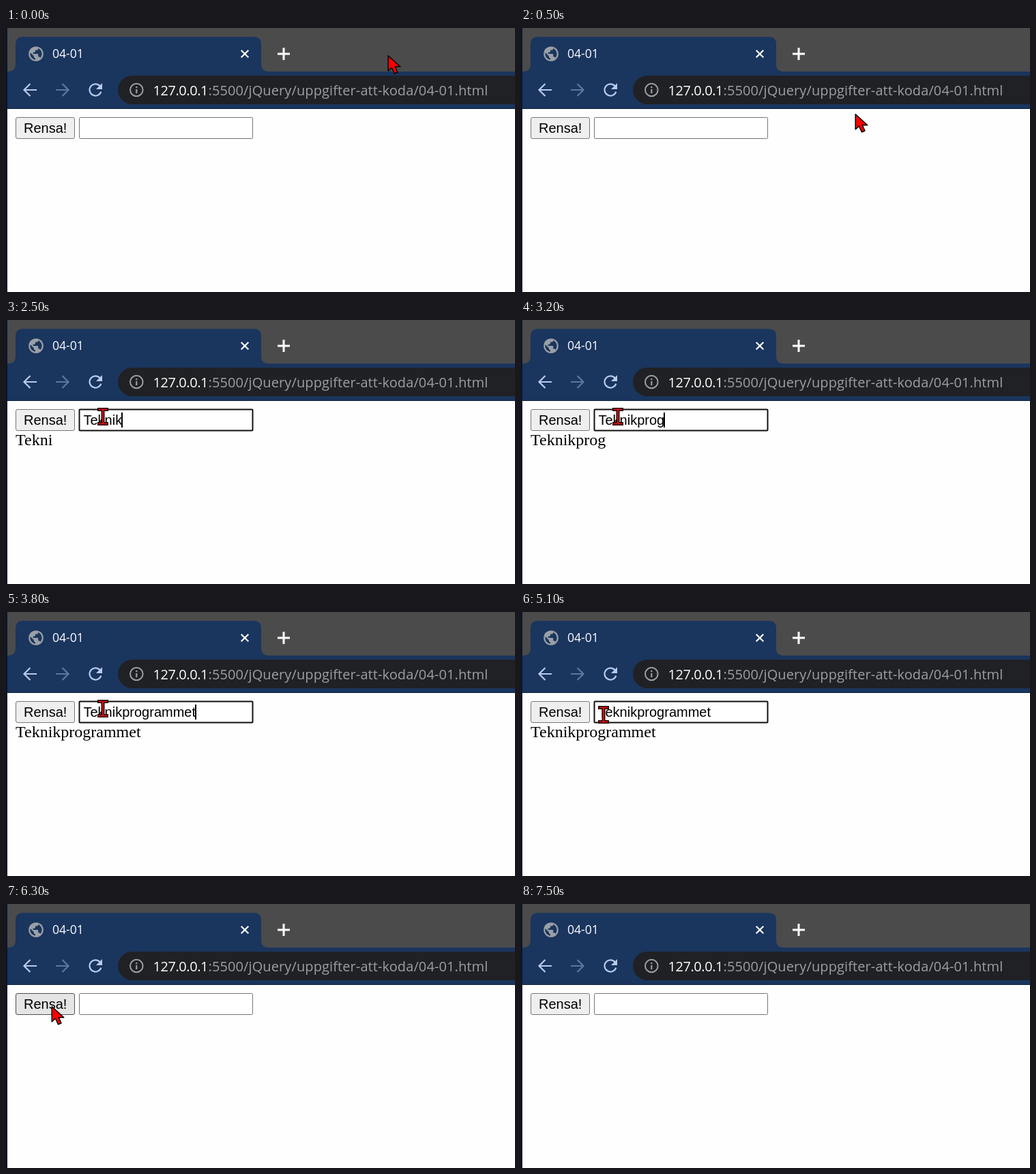
Write an HTML page that moves like this. It is 746 px wide and 388 px high and loops after 7.6 s.

```html
<!DOCTYPE html>
<html lang="sv">
<head>
<meta charset="utf-8">
<title>04-01</title>
<style>
  html, body { margin: 0; width: 100%; height: 100%; overflow: hidden; background: #fefefe; }
  svg { display: block; }
  .ui { font-family: "Open Sans", "Noto Sans", sans-serif; }
  .field { font: 20px "Liberation Sans", Arial, sans-serif; }
  .page { font: 24px "Liberation Serif", "Times New Roman", serif; }
  .line { fill: none; stroke-width: 2.2; }
  #button { fill: #efefef; stroke: #767676; }
  #button.hover { fill: #e5e5e5; stroke: #4f4f4f; }
  #button.pressed { fill: #f5f5f5; stroke: #8d8d8d; }
  #input { fill: #fff; stroke: #767676; }
  #input.focus { stroke: #101010; stroke-width: 2; }
</style>
</head>
<body>
<svg width="746" height="388" viewBox="0 0 746 388">
  <rect width="746" height="388" fill="#fefefe"/>

  <!-- browser frame -->
  <rect width="746" height="66" fill="#4b4b4b"/>
  <rect y="64" width="746" height="55" fill="#1a355e"/>
  <path d="M3 64Q14 64 14 53V24Q14 13 25 13H363Q374 13 374 24V53Q374 64 385 64Z" fill="#1a355e"/>
  <rect y="118" width="746" height="1" fill="#0d2140"/>
  <rect width="2" height="388" fill="#081630"/>

  <!-- tab -->
  <circle cx="44" cy="38" r="10.8" fill="#9aa0a6"/>
  <path d="M43 46.6C38.700 46 35.400 42.400 35.400 38Q35.400 37 35.600 36.100L40.800 41.200V42.300Q41 44.300 43 44.500ZM50.400 43.800Q49.800 42.300 48.300 42.300H47.200V39.100Q47.100 38 46.200 38H39.700V35.800H41.800Q42.900 35.700 42.900 34.800V32.600H45.100Q47 32.400 47.200 30.500V30C50.400 31.300 52.600 34.400 52.600 38Q52.600 41.400 50.400 43.800Z" fill="#1a355e"/>
  <text class="ui" x="68" y="44" font-size="17.6" fill="#fff">04-01</text>
  <path class="line" d="M344.7 32.7L355.3 43.3M355.3 32.7L344.7 43.3" stroke="#fff"/>
  <path d="M398 38H416M407 29V47" stroke="#fff" stroke-width="3"/>

  <!-- toolbar -->
  <path class="line" d="M45 91H27M35.5 82L26.5 91L35.5 100" stroke="#b8cbec"/>
  <path class="line" d="M73 91H91M82.5 82L91.5 91L82.5 100" stroke="#5f779f"/>
  <path class="line" d="M138.3 86.2A8.6 8.6 0 1 0 139.3 93.6" stroke="#b8cbec"/>
  <path d="M141 81V90H132Z" fill="#b8cbec"/>
  <path d="M746 70H185A21 21 0 0 0 185 112H746Z" fill="#202124"/>
  <circle cx="191.3" cy="91" r="9.3" fill="none" stroke="#9aa0a6" stroke-width="2"/>
  <path d="M190.2 90H192.4V96H190.2ZM190.2 86H192.4V88.2H190.2Z" fill="#9aa0a6"/>
  <text class="ui" x="215.5" y="98.6" font-size="20" letter-spacing="-.45" fill="#fff">127.0.0.1</text>
  <text class="ui" x="296.5" y="98.6" font-size="20" letter-spacing=".1" fill="#9aa0a6">:5500/jQuery/uppgifter-att-koda/04-01.html</text>

  <!-- page -->
  <rect id="button" x="14.5" y="131.5" width="86" height="31" rx="2.5"/>
  <text class="field" x="26" y="154">Rensa!</text>
  <rect id="input" x="107.5" y="131.5" width="254" height="31" rx="1"/>
  <text id="typed" class="field" x="113.5" y="154"></text>
  <rect id="caret" y="136" width="2" height="22"/>
  <text id="output" class="page" x="14" y="184"></text>

  <!-- pointers, hot spot at 0,0 -->
  <path id="arrow" d="M.2 .8V23L5.400 18.300L9.500 27L14 25L10.200 16.800H17.800Z"
        fill="#f00" stroke="#000" stroke-width="1.5" stroke-linejoin="round"/>
  <g id="beam" fill="none">
    <path d="M-8 -10.5H8M0 -10.5V10.5M-8 10.5H8" stroke="#1a0000" stroke-width="5"/>
    <path d="M-6.5 -10.5H6.5M0 -10.5V10.5M-6.5 10.5H6.5" stroke="#d41212" stroke-width="2.2"/>
  </g>
</svg>
<script>
const LOOP = 7600, STEP = 100, WORD = "Teknikprogrammet";
const FOCUS = 800, PRESS = 6000, RELEASE = 6300;
const TYPE_START = 1700, TYPE_END = 3700, KEY_HOLD = 60, BLINK = 460;

const [button, input, typed, caret, output, arrow, beam] =
  ["button", "input", "typed", "caret", "output", "arrow", "beam"].map(id => document.getElementById(id));

// time, x, y where the hand turns or rests
const path = [
  [0, 560, 40], [300, 679, 118], [FOCUS, 142, 142], [4600, 142, 142], [4900, 304, 145],
  [5100, 121, 151], [5300, 67, 150], [6500, 67, 150], [7000, 725, 82], [7100, 800, 70]
];
// time, index of the key pressed
const rhythm = [[TYPE_START, 0], [2450, 5], [3230, 10], [TYPE_END, 15]];

const linear = u => u;
const smooth = u => u * u * (3 - 2 * u);

function track(points, t, ease) {
  const next = points.findIndex(p => p[0] > t);
  if (next < 0) return points.at(-1).slice(1);
  const [a, b] = [points[next - 1], points[next]];
  const u = ease((t - a[0]) / (b[0] - a[0]));
  return a.slice(1).map((v, i) => v + (b[i + 1] - v) * u);
}

const lettersAt = t => t < TYPE_START ? 0 : Math.floor(track(rhythm, t, linear)[0]) + 1;
const show = (node, on) => node.setAttribute("visibility", on ? "visible" : "hidden");

function inside(node, x, y) {
  const box = node.getBBox();
  return x >= box.x && x <= box.x + box.width && y >= box.y && y <= box.y + box.height;
}

function caretOn(t) {
  if (t >= TYPE_START && t < TYPE_END) return true;
  const since = t < TYPE_START ? FOCUS : TYPE_END;
  return Math.floor((t - since) / BLINK) % 2 === 0;
}

function draw(t) {
  const [x, y] = track(path, t, smooth);
  const overInput = inside(input, x, y);
  show(beam, overInput);
  show(arrow, !overInput);
  (overInput ? beam : arrow).setAttribute("transform", `translate(${Math.round(x)} ${Math.round(y)})`);

  const cleared = t >= RELEASE;
  typed.textContent = cleared ? "" : WORD.slice(0, lettersAt(t));
  output.textContent = cleared ? "" : WORD.slice(0, lettersAt(t - KEY_HOLD));

  const focused = t >= FOCUS && t < PRESS;
  const width = typed.textContent ? typed.getComputedTextLength() : 0;
  caret.setAttribute("x", 113 + Math.floor(width));
  show(caret, focused && caretOn(t));

  input.classList.toggle("focus", focused);
  button.classList.toggle("hover", inside(button, x, y));
  button.classList.toggle("pressed", t >= PRESS && t < RELEASE);
}

let start = null, last = -1;
function tick(now) {
  start ??= now;
  const t = Math.floor(((now - start) % LOOP) / STEP) * STEP;
  if (t !== last) draw(last = t);
  requestAnimationFrame(tick);
}
draw(0);
requestAnimationFrame(tick);
</script>
</body>
</html>
```
